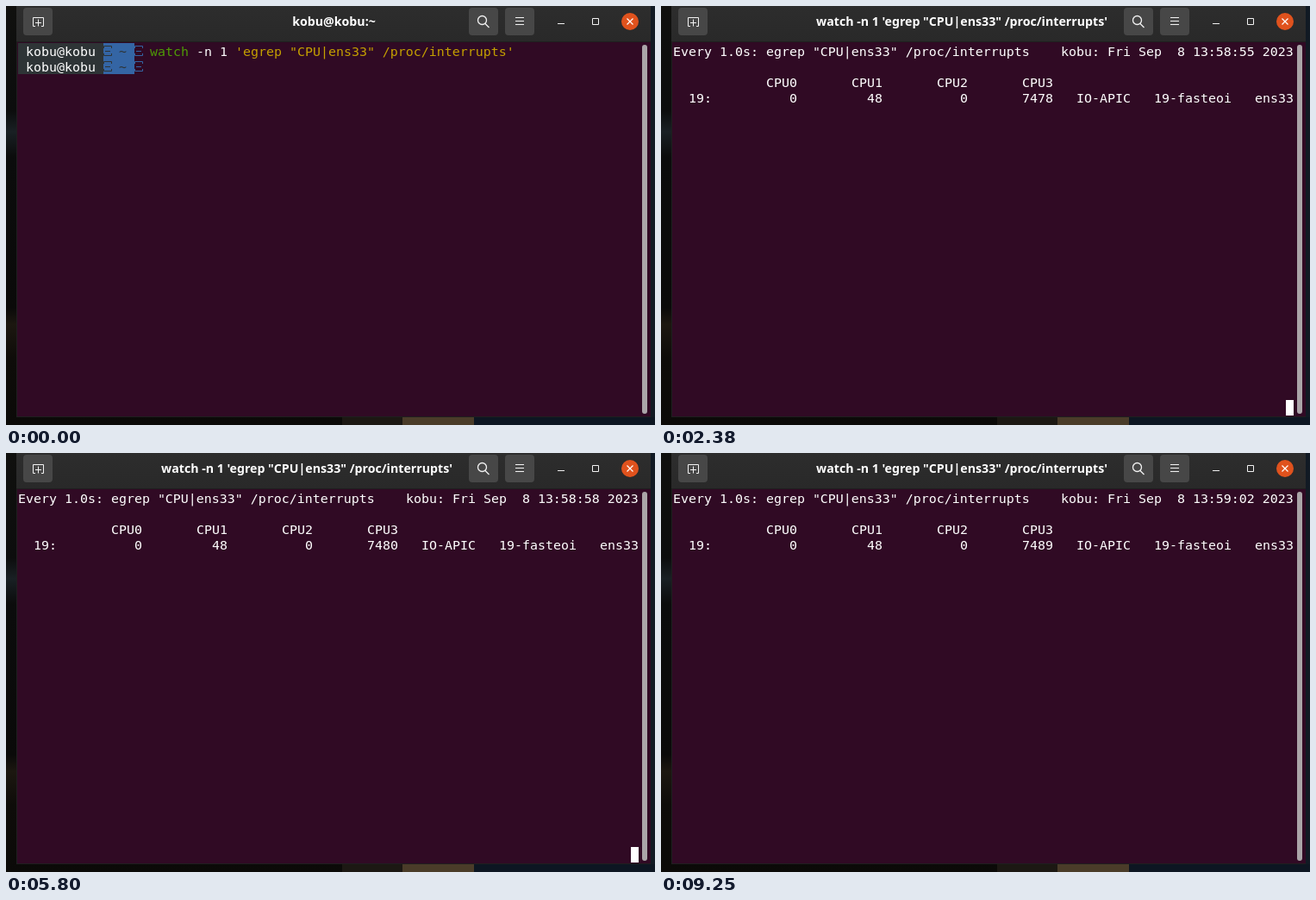
Write an HTML page with a canvas that moves like this. It is 753 by 486 pixels and loops after 9.45 s.

```html
<!DOCTYPE html>
<html lang="en">
<head>
<meta charset="utf-8">
<title>Terminal</title>
<style>
  html, body { margin: 0; width: 100%; height: 100%; overflow: hidden; background: #0b0b0a; }
  canvas { display: block; }
</style>
</head>
<body>
<canvas id="stage" width="753" height="486"></canvas>
<script>
const ctx = document.getElementById('stage').getContext('2d');
const LOOP = 9450, CELL_W = 9, CELL_H = 18, LEFT = 14, TOP = 43;
const MONO = '14.95px "DejaVu Sans Mono", monospace';
const BOLD = 'bold 14.2px "Noto Sans", "Open Sans", sans-serif';
const USER = 'kobu', PROMPT = USER + '@' + USER;
const WHITE = '#fff', SLATE = '#2e3436', BLUE = '#3465a4', GREEN = '#4e9a06', YELLOW = '#c4a000';
const COMMAND = `watch -n 1 'egrep "CPU|ens33" /proc/interrupts'`;

// Each entry is [start time, value...]; the last one already started applies.
const CLOCK = [[2380, '13:58:55', 7478], [3200, '13:58:56', 7479], [4400, '13:58:57', 7479],
  [5200, '13:58:58', 7480], [6200, '13:58:59', 7480], [7220, '13:59:00', 7481],
  [8250, '13:59:01', 7488], [9250, '13:59:02', 7489]];
const POINTER = [[200, 695, 462], [380, 640, 395], [580, 590, 335], [1380],
  [7850, 590, 335], [8050, 500, 190], [8250, 454, 131], [8450, 560, 300], [8650, 688, 478], [8850]];
const CURSOR = [[380, 1], [980, 0], [1380, 1], [1980, 0], [2380, 1], [2780, 0], [3400, 1], [4000, 0],
  [4600, 1], [5200, 0], [5800, 1], [6400, 0], [7020, 1], [7650, 0], [8250, 1], [8850, 0]];

const current = (steps, t) => steps.filter(s => s[0] <= t).pop() || [];

function rect(x, y, w, h, color) {
  ctx.fillStyle = color;
  ctx.fillRect(x, y, w, h);
}

function rounded(x, y, w, h, r, color) {
  ctx.fillStyle = color;
  ctx.beginPath();
  ctx.roundRect(x, y, w, h, r);
  ctx.fill();
}

function stroke(path, color = '#f2f2f2', width = 1) {
  ctx.strokeStyle = color;
  ctx.lineWidth = width;
  ctx.stroke(new Path2D(path));
}

function print(col, row, text, color = WHITE) {
  ctx.font = MONO;
  ctx.fillStyle = color;
  ctx.fillText(text, LEFT + col * CELL_W, TOP + row * CELL_H + 15);
}

function block(col, row, cells = 1, color = WHITE) {
  rect(LEFT + col * CELL_W, TOP + row * CELL_H, cells * CELL_W, CELL_H, color);
}

function separator(col, row, color) {
  const x = LEFT + col * CELL_W, y = TOP + row * CELL_H;
  stroke(`M${x + .5} ${y + 6}v-2.5h9v2.5M${x + 2} ${y + 9.5}h6M${x + .5} ${y + 12}v2.5h9v-2.5`, color);
}

function desktop() {
  const wall = ctx.createLinearGradient(0, 0, 0, 486);
  [[0, '#10100e'], [.25, '#0c0d0d'], [.3, '#192024'], [.36, '#0b0c0c'],
   [.72, '#0a0a09'], [.76, '#1c1710'], [.84, '#0e0c09'], [1, '#0b0a08']]
    .forEach(([at, color]) => wall.addColorStop(at, color));
  rect(0, 0, 753, 486, wall);
  rect(390, 477, 70, 9, '#1c1813');
  rect(460, 477, 83, 9, '#4a3c29');
  rect(543, 477, 210, 9, '#0d1622');
  rect(748, 0, 5, 477, '#111a24');
}

function windowFrame(title, center) {
  rect(12, 0, 736, 477, '#1f1f1f');
  const bar = ctx.createLinearGradient(0, 0, 0, 41);
  bar.addColorStop(0, '#2d2d2d');
  bar.addColorStop(1, '#292929');
  rect(12, 0, 736, 41, bar);
  rect(13, 42, 735, 434, '#300a24');
  rounded(738, 45, 6, 428, 3, '#aaa5a8');

  ctx.font = BOLD;
  ctx.fillStyle = WHITE;
  ctx.textAlign = 'center';
  ctx.fillText(title, center, 23);
  ctx.textAlign = 'left';

  for (const x of [20, 537, 579]) rounded(x, 2, 34, 32, 4, '#474747');
  stroke('M34 23.5h-2.5v-10h12v10h-2.5M37.5 15.5v8M34 19.5h7');
  stroke('M557.5 16.5a5 5 0 1 1-10 0a5 5 0 1 1 10 0M556 20.5l4.5 4.5', '#f2f2f2', 1.3);
  stroke('M591 13.5h10M591 17.5h10M591 21.5h10');
  stroke('M640 20.5h8M680.5 14.5h7v7h-7z');
  rounded(714, 8, 20, 20, 10, '#e0521d');
  stroke('M720.5 14.5l7 7M727.5 14.5l-7 7', WHITE, 1.2);
}

function shellLine(row, typed) {
  block(0, row, 11, SLATE);
  block(11, row, 4, BLUE);
  print(1, row, PROMPT);
  separator(11, row, SLATE);
  print(13, row, '~', SLATE);
  separator(15, row, BLUE);
  if (!typed) return;
  print(17, row, COMMAND.slice(0, 5), GREEN);
  print(23, row, COMMAND.slice(6, 10));
  print(28, row, COMMAND.slice(11), YELLOW);
}

function watchScreen(time, count) {
  print(0, 0, 'Every 1.0s: egrep "CPU|ens33" /proc/interrupts');
  print(50, 0, `${USER}: Fri Sep  8 ${time} 2023`);
  [0, 48, 0, count].forEach((value, i) => {
    print(12 + i * 11, 2, 'CPU' + i);
    print(16 + i * 11 - String(value).length + (i && 0), 3, String(value));
  });
  print(2, 3, '19:');
  print(52, 3, 'IO-APIC');
  print(62, 3, '19-fasteoi');
  print(75, 3, 'ens33');
}

function pointer(x, y) {
  const beam = `M${x - 3} ${y - 6.5}h7M${x + .5} ${y - 6.5}v14M${x - 3} ${y + 7.5}h7`;
  stroke(beam, WHITE, 3);
  stroke(beam, '#1a0a16', 1);
}

function draw(t) {
  const watching = t >= 2380, typed = t >= 1380;
  const [, cursorOn] = current(CURSOR, t);
  const [, px, py] = current(POINTER, t);
  desktop();
  windowFrame(watching ? COMMAND : PROMPT + ':~', watching ? 349 : 380.5);
  if (watching) {
    const [, time, count] = current(CLOCK, t);
    watchScreen(time, count);
  } else {
    shellLine(0, true);
    shellLine(1, typed);
  }
  if (cursorOn) watching ? block(79, 23) : block(typed ? 64 : 17, 1);
  if (px) pointer(px, py);
}

function tick() {
  draw(performance.now() % LOOP);
  requestAnimationFrame(tick);
}
tick();
</script>
</body>
</html>
```
